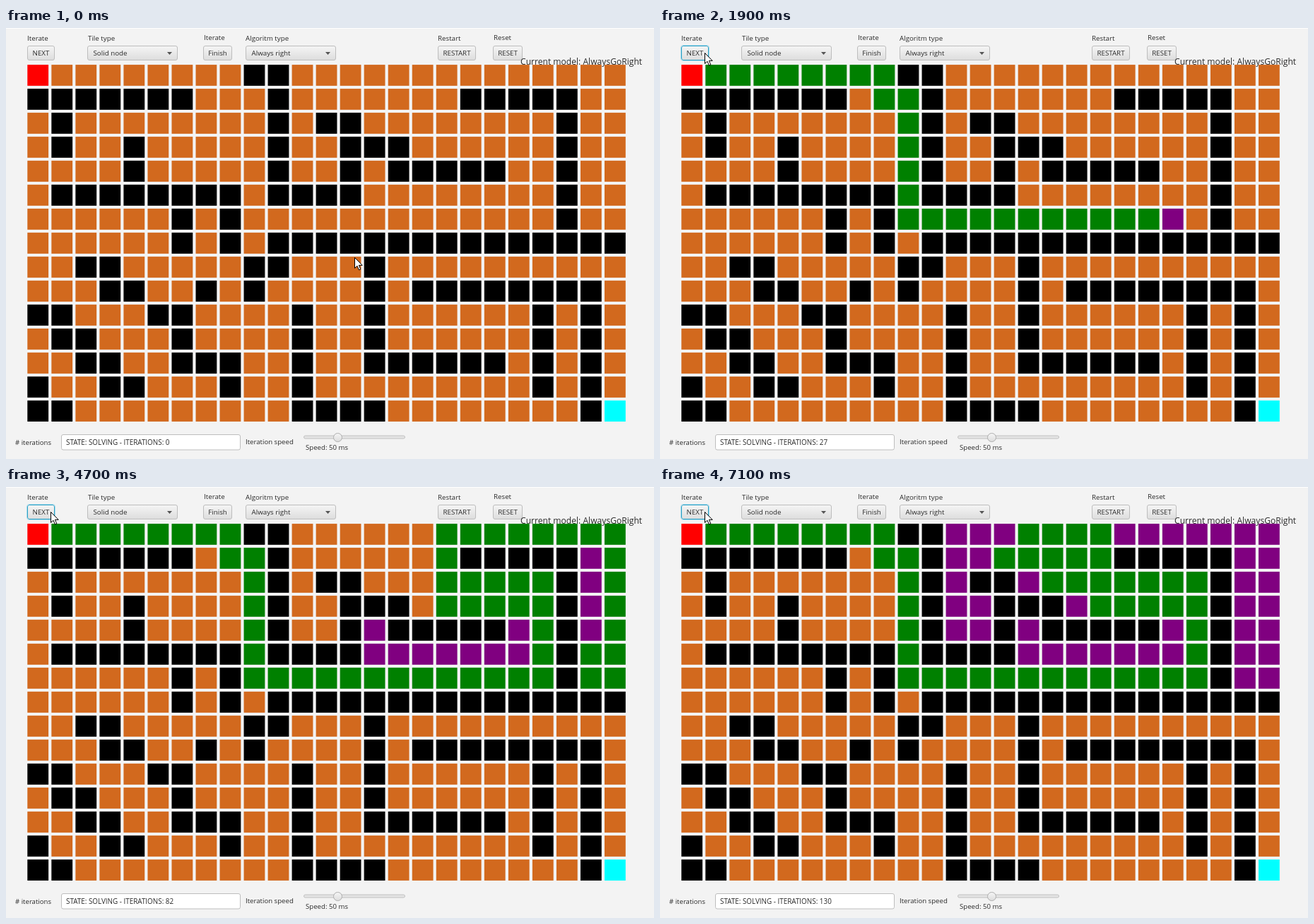
Write an HTML page that moves like this. It is 917 by 611 pixels and loops after 7200 ms.

```html
<!DOCTYPE html>
<html lang="en">
<head>
<meta charset="utf-8">
<title>Maze solver</title>
<style>
  html, body { margin: 0; width: 100%; height: 100%; overflow: hidden; background: #f3f3f3; }
  svg { display: block; width: 917px; height: 611px; }
  text { font-family: "Open Sans", "Noto Sans", sans-serif; font-size: 9.75px; fill: #2b2b2b; white-space: pre; }
</style>
</head>
<body>
<svg id="stage" viewBox="0 0 917 611" xmlns="http://www.w3.org/2000/svg">
  <defs>
    <linearGradient id="face" x1="0" y1="0" x2="0" y2="1">
      <stop offset="0" stop-color="#f5f5f5"/>
      <stop offset="1" stop-color="#dddddd"/>
    </linearGradient>
  </defs>
  <rect width="917" height="611" fill="#f3f3f3"/>
  <rect width="917" height="1" fill="#fff"/>
</svg>
<script>
const LOOP = 7200, STEP = 100, COLS = 25, ROWS = 15, PITCH = 34.03;
const COLOR = {
  open: '#d2691e', wall: '#000', path: '#008000',
  tried: '#800080', start: '#f00', goal: '#0ff'
};
// Wall columns of each row, as single columns or runs
const WALLS = [
  '9-10', '0-6 10 18-22', '1 10 12-13 22', '1 4 10 13-15 22', '4 10 13 15-19 22',
  '1-8 10-13 22', '6 8 22', '6 8 10-24', '2-3 9-10 14', '3-4 7 9 14 16-23',
  '0-1 5-6 11 14 21 23', '1-2 6 11 14 21 23', '2-3 6-8 11 14-19 21 23',
  '0 3-4 8 11 21 23', '0-1 11-14 23'
];
// Order of preference: right, down, up, left
const MOVES = [[1, 0], [0, 1], [0, -1], [-1, 0]];

const stage = document.getElementById('stage');

function add(tag, attrs, content) {
  const el = document.createElementNS('http://www.w3.org/2000/svg', tag);
  for (const key in attrs) el.setAttribute(key, attrs[key]);
  if (content) el.textContent = content;
  return stage.appendChild(el);
}
const label = (x, y, content, size = 9.75) =>
  add('text', { x, y, style: `font-size:${size}px` }, content);
const box = (x, y, width, height, fill, stroke, rx = 2.5) =>
  add('rect', { x, y, width, height, rx, fill, stroke });

function button(x, width, content) {
  const face = box(x + .5, 25.5, width - 1, 20, 'url(#face)', '#bdbdbd');
  const text = label(x + width / 2, 39, content);
  text.setAttribute('text-anchor', 'middle');
  return face;
}
function combo(x, content) {
  box(x + .5, 25.5, 127, 20, 'url(#face)', '#bdbdbd');
  label(x + 8.5, 39, content);
  add('path', { d: `M${x + 113} 34h7l-3.5 4z`, fill: '#555' });
}

// Controls
label(30, 18, 'Iterate');
label(116, 18, 'Tile type');
label(280, 17, 'Iterate');
label(339, 18, 'Algoritm type');
label(611, 18, 'Restart');
label(690, 17, 'Reset');
const next = button(30, 39, 'NEXT');
const glow = box(29.5, 24.5, 40, 22, 'none', '#a9dcec', 3.5);
combo(115, 'Solid node');
button(279, 41, 'Finish');
combo(339, 'Always right');
button(611, 54, 'RESTART');
button(689, 42, 'RESET');

// Board
const wall = WALLS.map(row => {
  const line = Array(COLS).fill(false);
  for (const run of row.split(' ')) {
    const [from, to = from] = run.split('-').map(Number);
    line.fill(true, from, to + 1);
  }
  return line;
});
const tiles = [];
for (let r = 0; r < ROWS; r++) {
  for (let c = 0; c < COLS; c++) {
    tiles.push(add('rect', {
      x: (30.3 + c * PITCH).toFixed(2), y: (52.1 + r * 34).toFixed(2),
      width: 29.8, height: 29.8
    }));
  }
}
label(728, 52, 'Current model: AlwaysGoRight', 12.1);

// Status bar
label(13, 591, '# iterations', 9.6);
box(78.5, 576.5, 253, 21.5, '#fff', '#bdbdbd');
const status = label(85, 591, '', 9.9);
label(339, 590, 'Iteration speed', 9.65);
box(421.5, 578, 143, 4, '#e4e4e4', '#c0c0c0', 2);
add('circle', { cx: 469.5, cy: 580.5, r: 6, fill: 'url(#face)', stroke: '#adadad' });
label(424, 598, 'Speed: 50 ms', 9.65);

const cursor = add('path', {
  d: 'M0 0V15L3.5 11.8L6 17.5L8.3 16.5L5.9 10.9H10.7Z',
  fill: '#fff', stroke: '#000', 'stroke-width': 1
});

// Depth-first walk, one cell per iteration, after the given number of iterations
function solve(count) {
  const seen = new Set([0]), trail = [0];
  for (let i = 1; i < count; i++) {
    const head = trail[trail.length - 1];
    const x = head % COLS, y = (head - x) / COLS;
    const move = MOVES.find(([dx, dy]) => {
      const c = x + dx, r = y + dy;
      return c >= 0 && c < COLS && r >= 0 && r < ROWS &&
        !wall[r][c] && !seen.has(r * COLS + c);
    });
    if (move) {
      const cell = head + move[0] + move[1] * COLS;
      seen.add(cell);
      trail.push(cell);
    } else if (trail.length > 1) trail.pop();
  }
  return { seen, head: trail[trail.length - 1], onTrail: new Set(trail) };
}

function tileColor(i, state) {
  if (i === 0) return COLOR.start;
  if (i === tiles.length - 1) return COLOR.goal;
  if (wall[Math.floor(i / COLS)][i % COLS]) return COLOR.wall;
  if (!state.seen.has(i)) return COLOR.open;
  return i !== state.head && state.onTrail.has(i) ? COLOR.path : COLOR.tried;
}

function draw(time) {
  const t = Math.floor((time % LOOP) / STEP) * STEP;
  const count = Math.max(0, Math.floor(t * .0198 - 10.32));
  const state = solve(count);
  tiles.forEach((tile, i) => tile.setAttribute('fill', tileColor(i, state)));
  status.textContent = 'STATE: SOLVING - ITERATIONS: ' + count;

  const p = Math.min(1, t / 500), ease = p * p * (3 - 2 * p);
  cursor.setAttribute('transform',
    `translate(${493.5 - 430 * ease} ${325.5 - 290 * ease})`);
  const focused = t >= 500;
  next.setAttribute('stroke', focused ? '#2a9fc4' : '#bdbdbd');
  glow.setAttribute('visibility', focused ? 'visible' : 'hidden');
}

const begin = performance.now();
function tick() {
  draw(performance.now() - begin);
  requestAnimationFrame(tick);
}
draw(0);
requestAnimationFrame(tick);
</script>
</body>
</html>
```
